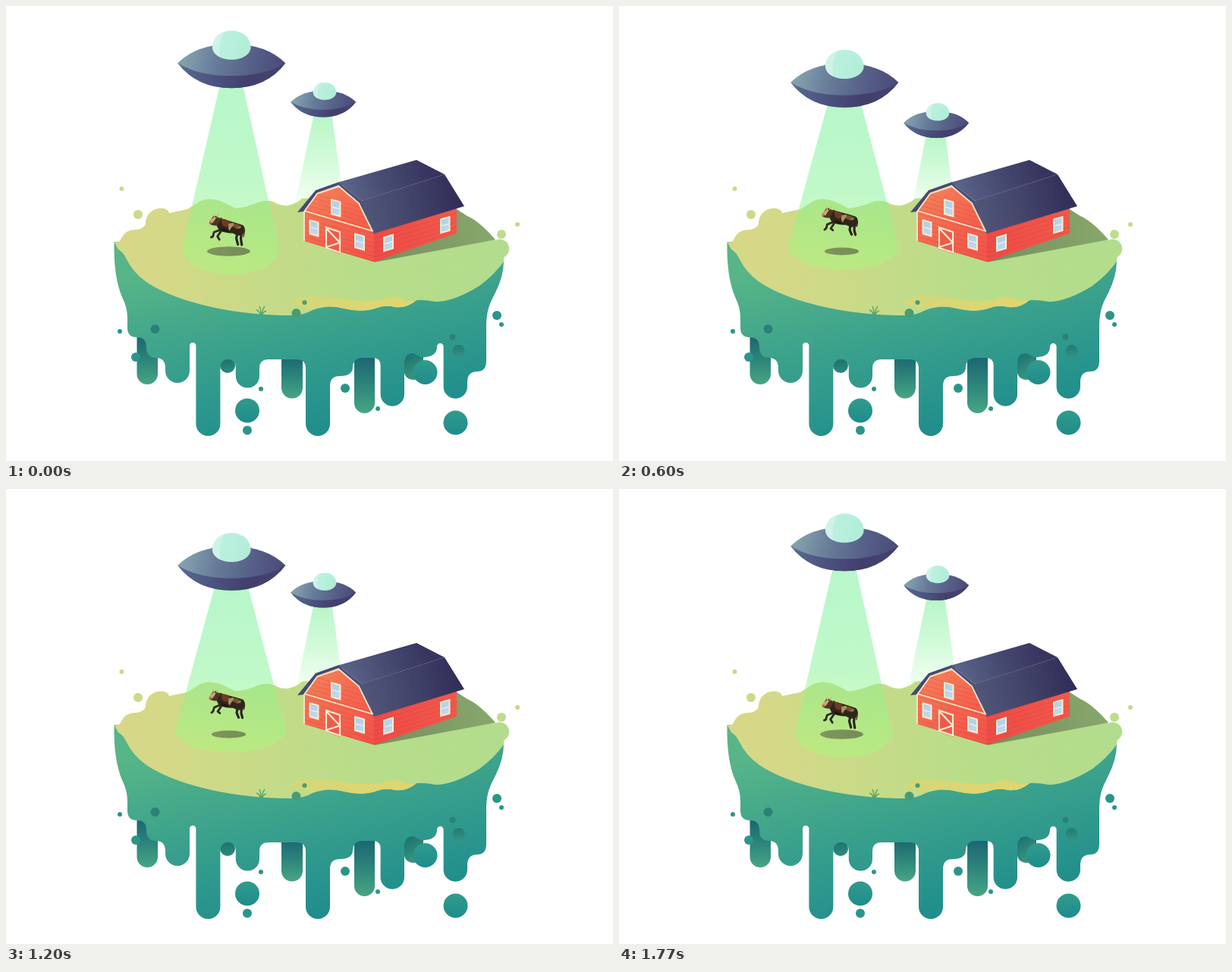
An HTML page with a canvas for the animation above (1800 ms loop, 800 by 600 pixels).

```html
<!DOCTYPE html>
<html lang="en">
<head>
<meta charset="utf-8">
<title>Farm visitors</title>
<style>
html, body { margin: 0; width: 100%; height: 100%; overflow: hidden; background: #fff; }
canvas { display: block; width: 800px; height: 600px; }
</style>
</head>
<body>
<canvas id="stage" width="800" height="600"></canvas>
<script>
const stage = document.getElementById('stage');
let c = stage.getContext('2d');
const LOOP = 1800, STEP = 30;

function ramp(x0, y0, x1, y1, ...colors) {
  const g = c.createLinearGradient(x0, y0, x1, y1);
  colors.forEach((col, i) => g.addColorStop(i / (colors.length - 1), col));
  return g;
}
function shape(d, fill) {
  c.fillStyle = fill;
  c.fill(new Path2D(d));
}
function line(d, color, width) {
  c.strokeStyle = color;
  c.lineWidth = width;
  c.stroke(new Path2D(d));
}
function oval(x, y, rx, ry, fill) {
  c.fillStyle = fill;
  c.beginPath();
  c.ellipse(x, y, rx, ry, 0, 0, 7);
  c.fill();
}
function dots(list, fill) {
  for (const [x, y, r] of list) oval(x, y, r, r, fill);
}

// Eased position between alternating rest points; 0 = high, 1 = low
function hover(t, keys) {
  let i = 0;
  while (i < keys.length - 2 && t >= keys[i + 1]) i++;
  const p = Math.min(1, (t - keys[i]) / (keys[i + 1] - keys[i]));
  const e = (1 - Math.cos(Math.PI * p)) / 2;
  return i % 2 ? 1 - e : e;
}

function drip(x, top, w, bottom) {
  c.fillStyle = ramp(0, top, 0, bottom, '#185f70', '#2b827a', '#46a684');
  c.beginPath();
  c.roundRect(x, top, w, bottom - top, [0, 0, w / 2, w / 2]);
  c.fill();
}

function island() {
  drip(172.5, 430, 27.5, 499);
  drip(363, 455, 28, 517.5);
  drip(459, 455, 27, 537);
  oval(292, 474, 10, 10, ramp(0, 464, 0, 484, '#1d6f70', '#2d8b7a'));
  shape('M524 460Q536 452 550 460V480Q549 493 536 493Q527 492 525 484Z',
    ramp(525, 458, 545, 493, '#1b6e70', '#3c9d80'));

  const soil = ramp(310, 325, 365, 570, '#57b588', '#47aa8a', '#39a08c', '#2d978d', '#208e8c');
  shape('M142.5 311C142 340 145 366 154 386Q160 398 160 412V424Q160 437 173 437' +
    'Q185 437 185 450Q185 464 198 464Q210 464 210 478V481a16 16 0 0 0 32 0' +
    'V448a4.2 4.2 0 0 1 8.4 0V551a16 16 0 0 0 32 0V476a10.2 10.2 0 0 1 20.4 0' +
    'V488a15.6 15.6 0 0 0 31.2 0V478Q334 466 346 466H383Q395 466 395 478' +
    'V551a16 16 0 0 0 32 0V501Q427 488 440 488Q457 488 457 476Q458 464 470 464' +
    'H484Q493.6 464 493.6 474V512a15.7 15.7 0 0 0 31.4 0V470Q526 457 538 458' +
    'Q545 464 552 463Q568 462 568 449a4.3 4.3 0 0 1 8.6 0V502a15.7 15.7 0 0 0 31.4 0' +
    'V496Q608 482 621 482Q633 482 633 468V425C633 400 638 392 645 378Q656 356 656 336Z', soil);
  dots([[150, 429, 3], [171, 463, 6], [336, 505, 3], [447, 504, 6], [490, 531, 3],
    [647, 408, 6], [653, 420, 3], [318, 559.5, 6]], '#2b958a');
  for (const [x, y] of [[318, 533.5], [552.5, 483], [592.5, 549.5]])
    oval(x, y, 16, 16, ramp(x, y - 16, x, y + 16, '#319b8c', '#1f8c8c'));
  dots([[196.5, 426, 6], [588.5, 436.5, 4]], '#2b8178');
  oval(596.5, 455, 8, 8, ramp(0, 447, 0, 463, '#247a74', '#339281'));

  const grass = ramp(190, 340, 630, 290, '#d6d887', '#c6db88', '#b6dd8a', '#b3dc8c');
  shape('M142.5 311Q149 314 152 306Q158 294 172 295Q180 294 184 288C184 263 214 263 215 273' +
    'Q224 271 239 268Q249 262 256 257Q268 252 282 257Q294 262 302 267Q322 264 332 259' +
    'Q346 254 356 260Q365 264 372 263Q384 260 390 254Q396 253 400 254L598 274L608 277' +
    'Q624 284 645 309A11.5 11.5 0 0 1 656.5 331L656 337Q644 354 624 369Q590 390 566 390' +
    'Q550 387 541 388Q528 399 513 397Q500 394 489 398Q470 405 446 399Q425 393 404 401' +
    'Q390 409 372 408C310 408 230 394 185 364Q167 351 159 334Q154 324 148 321Z', grass);
  oval(649.5, 321.5, 11.5, 11.5, grass);
  dots([[152.5, 241, 3], [174, 275, 6]], '#cdd98b');
  dots([[653, 301, 6], [674, 288, 3]], '#c0dc8e');

  shape('M374 392Q384 384 397 383Q425 383 446 387Q475 391 499 387L501 384L504 386L506 382' +
    'L509 386L512 382L514 386L518 383L519 387L524 385V389Q533 388 541 388' +
    'Q528 399 513 397Q500 394 489 398Q470 405 446 399Q425 393 404 400Q394 396 374 392Z',
    ramp(375, 0, 541, 0, '#d2d879', '#dcd672', '#e0d66f'));
  dots([[382.5, 405, 6], [393.5, 391, 3]], '#479c74');
  line('M336 407Q336 400 334 396M337 407Q338 400 341 396M335 407Q334 402 330 401' +
    'M338 407Q339 403 343 402', '#55a565', 1.4);
}

function pane(x, y, w, h, slope) {
  c.save();
  c.transform(1, slope, 0, 1, x, y);
  c.fillStyle = '#f8ecd0';
  c.fillRect(0, 0, w, h);
  c.fillStyle = ramp(0, 0, w, h, '#a9cfe3', '#c9d9f1');
  c.fillRect(2, 2, w - 4, h - 4);
  c.fillStyle = '#eef3f5';
  c.fillRect(2, h / 2 - .6, w - 4, 1.2);
  c.restore();
}

function planks(clip, x, y, w, slope, count) {
  c.save();
  c.clip(new Path2D(clip));
  for (let i = 0; i < count; i++)
    line(`M${x} ${y + i * 6}l${w} ${w * slope}`, 'rgba(196,48,52,.28)', .8);
  c.restore();
}

function barn() {
  shape('M485 338L594 268L608 277Q624 284 645 308L630 311Z',
    ramp(490, 330, 640, 290, '#78905f', '#809a66', '#86a86c'));
  const front = 'M393 268L409 246L439 237L466 259L485 298V337.5L393 310Z';
  const side = 'M485 298L594 266V300L485 337.5Z';
  shape(front, ramp(405, 245, 470, 335, '#f47e59', '#f4664f', '#f2554a'));
  shape(side, ramp(485, 0, 594, 0, '#ee4b47', '#f0594a'));
  planks(front, 390, 243, 100, .29, 14);
  planks(side, 485, 301, 110, -.31, 7);

  shape('M384 272L408 243L439 232L447 236L439 236L410 246L393 271Z', '#444a70');
  shape('M438 232.5L541 203L578 222L469 257Z', ramp(450, 245, 555, 208, '#5a6387', '#464970', '#37345f'));
  shape('M438 232.5L469 257L485 300L482 297L465 260L439 237Z', '#4b5179');
  shape('M468.5 257L578 222L604 264L485 300Z', ramp(475, 270, 595, 245, '#505578', '#424369', '#312e5a'));
  line('M393 310V271L410 247.5L439 238L465 260L483 297', '#f8e8c9', 1.8);
  line('M393 270L484 297', '#f8e8c9', 1.6);

  pane(428, 254, 13.5, 21, .27);
  pane(399.5, 281, 13, 20, .28);
  pane(459, 299, 14, 20, .28);
  pane(497, 304.5, 14, 20, -.3);
  pane(572, 280.5, 13.5, 20, -.28);
  shape('M421 291L441 297V327L421 320Z', '#f05a49');
  line('M422 292L440 298V325L422 319ZM422 293L440 312L422 318', '#f8ecd0', 2.2);
}

function nearBeam(u) {
  const top = 106 + 32 * u, half = 15.5 + 9 * u;
  const rx = 64 + 11 * u, y = 320 - 3 * u, ry = 34 - 5 * u;
  shape(`M${297 - half} ${top}L${296 - rx} ${y}A${rx} ${ry} 0 0 0 ${296 + rx} ${y}L${297 + half} ${top}Z`,
    ramp(0, top, 0, y + ry, 'rgba(116,240,152,.52)', 'rgba(130,241,148,.5)', 'rgba(168,250,122,.46)'));
}

function farBeam(off) {
  const top = 144 + off, k = off / 27;
  shape(`M${405.5 - k} ${top}L${382 + 6 * k} 256H${445 - 4 * k}L${429.5 + k} ${top}Z`,
    ramp(0, top, 0, 258, '#b8f6c8', '#d2fad8', '#f2fff2'));
}

function saucer(x, y, s, domeX) {
  c.save();
  c.translate(x, y);
  c.scale(s, s);
  shape('M-71 0Q-46 -25 0 -25T71 0Q46 33 0 33T-71 0Z'.replace('T71 0', 'Q46 -25 71 0').replace('T-71 0', 'Q-46 33 -71 0'),
    ramp(-60, -12, 68, 12, '#829fad', '#667a98', '#566088', '#4a4a77'));
  shape('M-71 0Q-44 17 0 17Q44 17 71 0Q46 33 0 33Q-46 33 -71 0Z',
    ramp(-65, 0, 65, 10, '#566990', '#4b527e', '#423f6d', '#444270'));
  c.translate(domeX, -23.3);
  const dome = new Path2D('M-25.3 3C-25 -27 25 -27 25.3 3C23 24 -23 24 -25.3 3Z');
  c.fillStyle = ramp(-25, -8, 25, 12, '#bdf0e0', '#b7f0dc', '#b0ecd6');
  c.fill(dome);
  c.clip(dome);
  shape('M-26 -20H-9Q-18 -4 -15 20H-26Z', 'rgba(220,244,240,.6)');
  c.restore();
}

function cow(u) {
  oval(293.5, 323.5, 28.5 - 7.5 * u, 6.2 - 1.6 * u, ramp(270, 0, 316, 0, '#80955b', '#758d58'));
  c.save();
  c.translate(292, 291 - 13.5 * u);
  c.rotate(.1 - .04 * u);
  c.lineCap = c.lineJoin = 'round';
  const k = 2.5 * u;
  line(`M-9 5L-17 9L-18 ${15 - k / 2}L-20 16M-8 7L-12 14L-9 ${18 - k}`, '#30271d', 2.8);
  line(`M14 6L13 14L16 ${22 - k}M19 4L19 14L21 ${22 - k}`, '#2d241b', 3.2);
  line(`M21 -2Q24 3 22 ${11 - k}`, '#44301f', 1.4);
  shape('M-17 -9Q-7 -11 1 -8Q12 -6 20 -4Q25 1 21 9Q15 12 8 8Q-2 9 -10 6Q-15 2 -17 -9Z', '#30251a');
  shape('M-9 -9Q0 -10 3 -5L0 0Q-6 2 -8 -4Z', '#6b3c24');
  shape('M5 -5Q13 -6 17 -2L14 2L8 0Z', '#75512f');
  shape('M1 -4L7 -6L8 -3L5 1L3 5L1 2Z', '#a9925e');
  shape('M12 0L18 -3L17 1Z', '#927d50');
  shape('M-9 3L-2 4L3 7L-6 6Z', '#17150f');
  shape('M-20 -12Q-15 -14 -10 -8L-14 0Q-20 1 -24 -1L-24 -5Z', '#503524');
  shape('M-19 -11L-16 -10L-20 -3L-24 -3L-24 -6Z', '#cda776');
  oval(-23, -3, 2, 1.8, '#c76b58');
  line('M-15 -11L-14 -15M-18 -11L-20 -14', '#c9b778', 1.3);
  line('M-13 -9L-9 -10', '#573820', 2);
  c.restore();
}

function still(paint) {
  const layer = document.createElement('canvas');
  layer.width = 800;
  layer.height = 600;
  const keep = c;
  c = layer.getContext('2d');
  paint();
  c = keep;
  return layer;
}
const land = still(island), house = still(barn);

function draw(t) {
  const u = hover(t, [0, 470, 905, 1325, 1780]);
  const off = 27.5 * hover(t, [0, 625, 1000, 1490, 1790]);
  c.fillStyle = '#fff';
  c.fillRect(0, 0, 800, 600);
  farBeam(off);
  c.drawImage(land, 0, 0);
  c.drawImage(house, 0, 0);
  saucer(418.2, 126.6 + off, .605, 3);
  nearBeam(u);
  cow(u);
  saucer(297.3, 75.2 + 32 * u, 1, 0);
}

const start = performance.now();
function tick() {
  const t = Math.floor((performance.now() - start) % LOOP / STEP) * STEP;
  draw(t < 60 ? 0 : t);
  requestAnimationFrame(tick);
}
tick();
</script>
</body>
</html>
```
